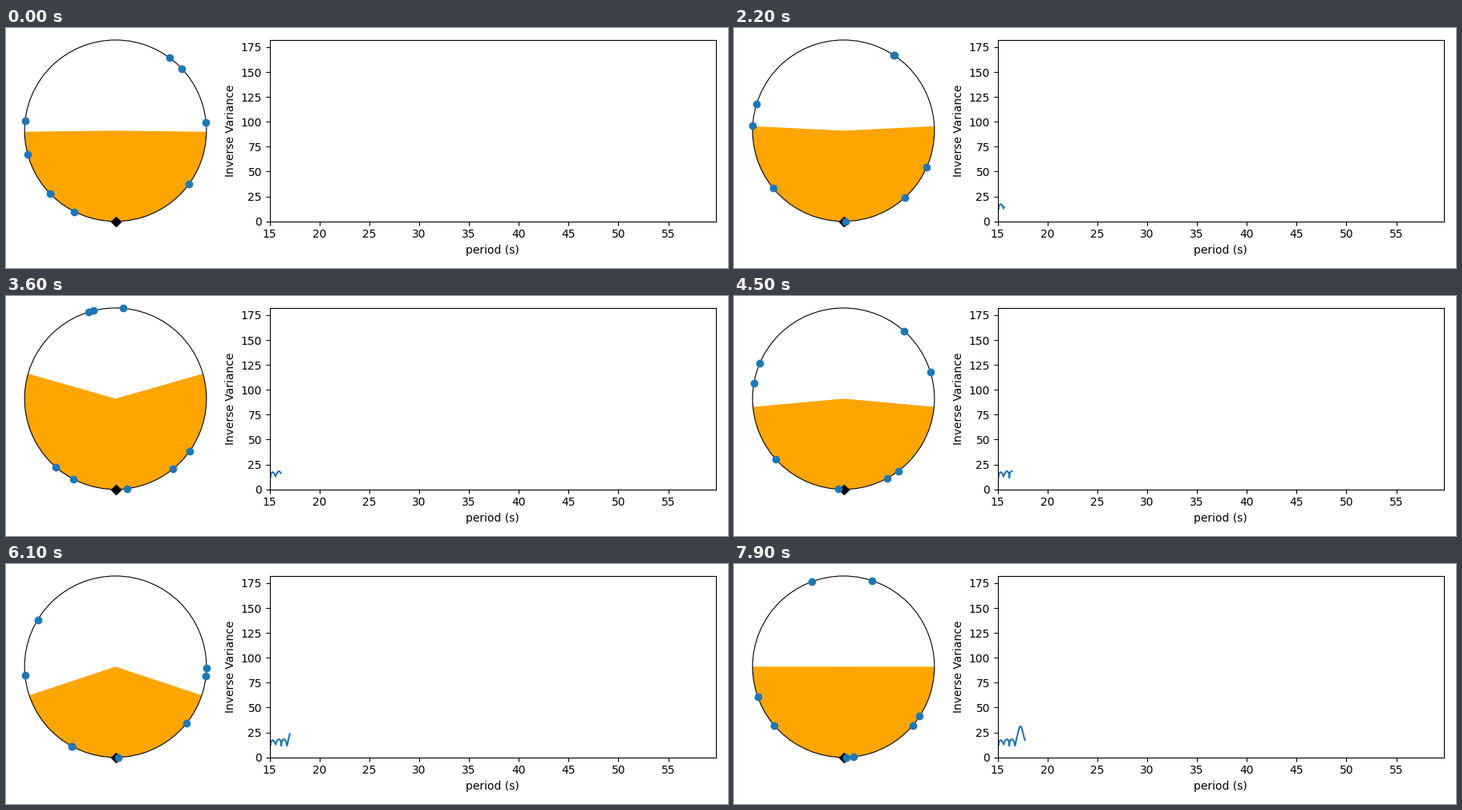
Recreate the animation shown at these times as a matplotlib script. Size 900 by 300 pixels, loop 8 s.

```python
import numpy as np
import matplotlib.pyplot as plt
from matplotlib.animation import FuncAnimation
from matplotlib.patches import Circle, Wedge

W, H, DPI = 900, 300, 100
FRAMES, INTERVAL = 80, 100

# Event times in seconds, folded at a steadily falling trial frequency
times = np.array([0, 116.700, 187.546, 225.439, 261.333, 268.415, 308.337, 380.446])
span = np.ptp(times)
step = 1 / (20 * span)
freqs = np.arange(1 / 15, 1 / 60, -step)
periods = 1 / freqs


def fold(freq):
    """Phases around their circular mean, in (-pi, pi], and their spread."""
    z = np.exp(2j * np.pi * times * freq)
    phase = np.angle(z * np.conj(z.sum()))
    return phase, phase.std()


folds = [fold(f) for f in freqs[:FRAMES]]
inv_var = np.array([(2 * np.pi / spread) ** 2 for _, spread in folds])


def add_axes(x0, y0, x1, y1):
    """Axes from pixel edges, y measured from the bottom."""
    return fig.add_axes([x0 / W, y0 / H, (x1 - x0) / W, (y1 - y0) / H])


fig = plt.figure(figsize=(W / DPI, H / DPI), dpi=DPI, facecolor="white")

BOTTOM, TOP = 58.3, 285
radius = (TOP - BOTTOM) / 2
dial = add_axes(136.5 - radius, BOTTOM, 136.5 + radius, TOP)
dial.set(xlim=(-1, 1), ylim=(-1, 1))
dial.axis("off")

wedge = Wedge((0, 0), 1, 180, 360, fc="orange", lw=0, clip_on=False)
dial.add_patch(wedge)
dial.add_patch(Circle((0, 0), 1, fill=False, ec="black", lw=0.8,
                      clip_on=False, zorder=2))
dial.plot(0, -1, "D", color="black", clip_on=False, zorder=3)
dots, = dial.plot([], [], "o", color="C0", clip_on=False, zorder=4)

graph = add_axes(328.7, BOTTOM, 885, TOP)
graph.set(xlim=(15, periods[-1]), ylim=(0, 182.2),
          xticks=range(15, 60, 5), yticks=range(0, 176, 25),
          xlabel="period (s)", ylabel="Inverse Variance")
curve, = graph.plot([], [], color="C0")


def update(n):
    phase, spread = folds[n]
    dots.set_data(np.sin(phase), -np.cos(phase))
    half = np.degrees(spread)
    wedge.set_theta1(270 - half)
    wedge.set_theta2(270 + half)
    curve.set_data(periods[:n], inv_var[:n])
    return wedge, dots, curve


anim = FuncAnimation(fig, update, frames=FRAMES, interval=INTERVAL,
                     repeat=True, repeat_delay=0, blit=False)
plt.show()
```
